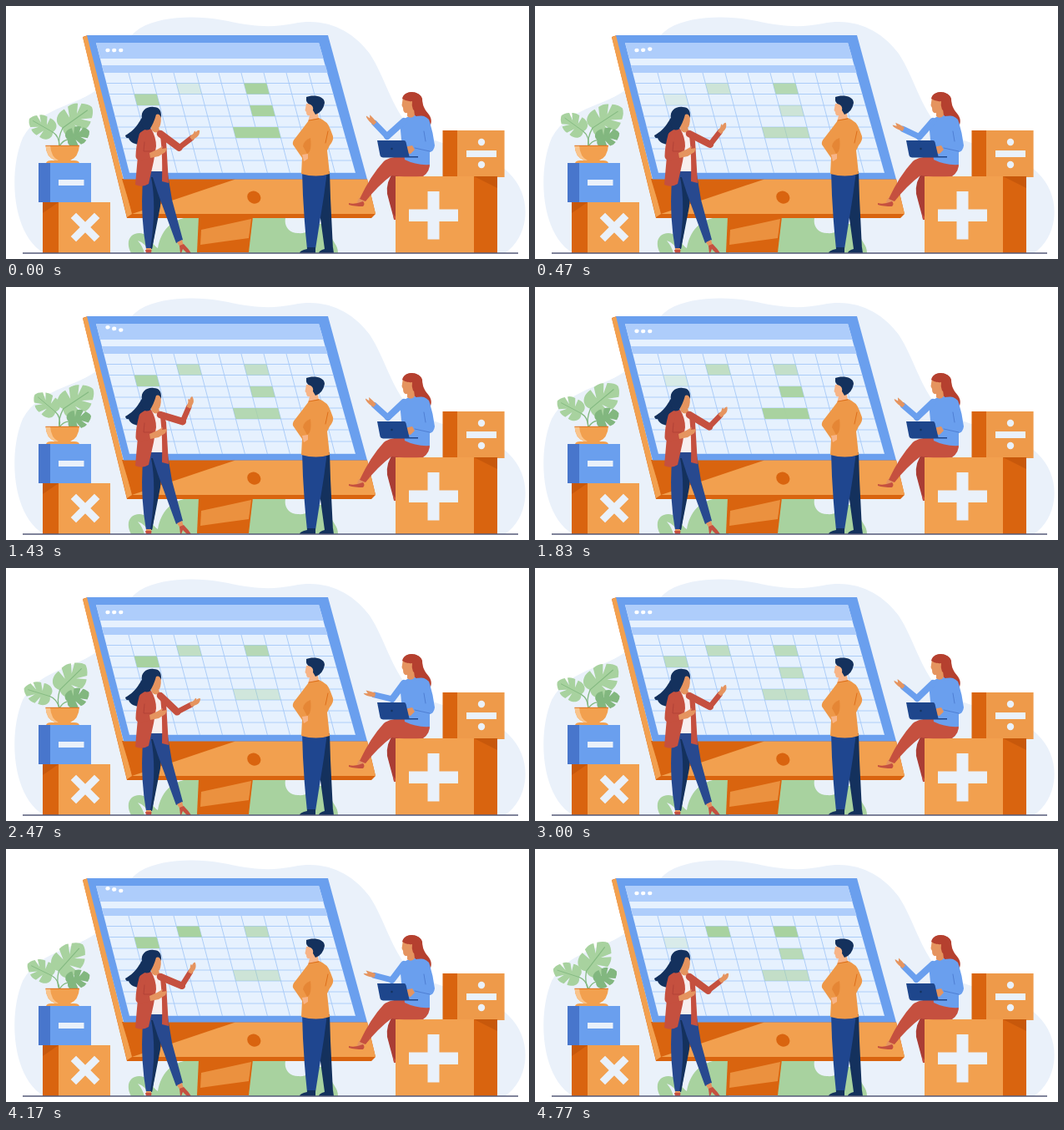
Write an HTML page that moves like this. It is 627 px wide and 303 px high and loops after 4.81 s.

```html
<!DOCTYPE html>
<html lang="en">
<head>
<meta charset="utf-8">
<title>Spreadsheet team</title>
<style>
html, body { margin: 0; width: 100%; height: 100%; overflow: hidden; background: #fff; }
svg { display: block; width: 100vw; height: 100vh; }
.bg { fill: #eaf1fa; }
.or { fill: #f2a04f; }
.dk { fill: #d9640f; }
.dd { fill: #c7580b; }
.bl { fill: #6a9fee; }
.nv { fill: #14315d; }
.red { fill: #c5503f; }
.skin { fill: #e5945f; }
.gr { fill: #a8d29f; }
.line { fill: none; stroke-linecap: round; stroke-linejoin: round; }
</style>
</head>
<body>
<svg viewBox="0 0 627 303">
  <path class="bg" d="M46 296C8 276 2 200 20 158C41 118 94 120 118 92C138 66 136 44 160 27C187 11 232 11 266 18C297 25 320 26 345 21C386 13 416 31 436 57C454 84 462 122 486 147C514 168 577 172 602 199C633 228 627 277 598 296Z"/>

  <!-- foliage behind the stand -->
  <path class="gr" d="M150 296C143 283 148 272 160 272C172 273 174 285 182 290C186 268 198 258 213 254H232V296ZM291 254H335C333 264 340 272 350 272C360 273 367 268 371 262C378 258 388 264 390 275C391 283 398 285 398 296H291Z"/>
  <path class="bg" d="M158 281Q168 284 172 296H166Q164 288 158 281ZM336 254H356V270Q339 274 336 254Z"/>

  <!-- monitor -->
  <path class="dk" d="M231 252H296L291 295H229Z"/>
  <path class="or" d="M234 268L294 255L291 278L233 286Z" opacity=".75"/>
  <path class="dk" d="M92 37L98 35L140 207H433L443 249L438 254H145Z"/>
  <path class="or" d="M92 37.5L98 35L151 249L145 253Z"/>
  <path class="dk" d="M139 207H276L152 250Z"/>
  <path class="or" d="M275 207.5H433L443 249H151Z"/>
  <ellipse class="dk" cx="297.3" cy="229" rx="8.3" ry="7.3" transform="rotate(25 297 229)"/>
  <path class="bl" d="M97 35H386L433 207.500H141Z"/>
  <path d="M108 44H375L419 200H148Z" fill="#e6f1fe"/>
  <path d="M108 44H375L380.5 63H113ZM115 71H383L385.6 80H117.3Z" fill="#aecdfb"/>
  <clipPath id="screen"><path d="M117 80H385.2L419 200H148Z"/></clipPath>
  <g clip-path="url(#screen)">
    <path id="grid" fill="none" stroke="#a5c9f8" stroke-width=".9"/>
    <g id="cells"></g>
  </g>
  <g id="dots" fill="#fff"></g>

  <!-- plant -->
  <g id="plant"></g>
  <path class="or" d="M47.500 167H88Q87 181 77 185H59Q48 181 47.500 167Z"/>
  <path d="M47.500 167H53Q54 181 63 185H59Q48 181 47.500 167Z" fill="#f9c48c"/>
  <path d="M47.500 167.300H88" stroke="#d9640f" stroke-width=".8"/>
  <path class="or" d="M48 188Q49 185 54 185H82Q87 185 88 188Z"/>

  <!-- boxes -->
  <path d="M39 188H54V235H39Z" fill="#4876cc"/>
  <path class="bl" d="M53 188H102V235H53Z"/>
  <path class="bg" d="M63 208H93.500V215H63Z"/>
  <path class="dk" d="M44 235H64V296H44Z"/>
  <path class="dd" d="M44 235H63L44 248Z"/>
  <path class="or" d="M63 235H125V296H63Z"/>
  <path class="bg" d="M75 260.500H115V269.500H75ZM90.500 245H99.500V285H90.500Z" transform="rotate(45 95 265)"/>
  <path class="dk" d="M523.500 149H542V205H523.500Z"/>
  <path d="M541 149H597.600V205H541Z" fill="#ee9a4a"/>
  <path class="bg" d="M552 173H588V181H552Z"/>
  <circle class="bg" cx="570" cy="163" r="4.200"/>
  <circle class="bg" cx="570" cy="190" r="4.200"/>

  <!-- presenter -->
  <path class="nv" d="M168 127C160 136 158 147 143 155Q144 159 147 158C148 163 155 166 161 166L175 152Z"/>
  <path d="M165 196H188L184 238L175 291H168Q160 246 165 196Z" fill="#28498f"/>
  <path class="nv" d="M174 205H188L185 240L175 291H173Q181 240 174 205Z"/>
  <path d="M173 196H193L199 232L212 280L204 284L182 224Z" fill="#28498f"/>
  <path class="skin" d="M168 290H174V293H168ZM205 283L211 280L213 287L209 289Z"/>
  <path class="red" d="M167 292H174.500L174 296H168ZM208 287L213 285Q219 291 222 296H217L212 291L210 296H209Z"/>
  <path d="M174 149H186L193 168L191 198H172Z" fill="#f7eeee"/>
  <path class="skin" d="M172 140H182L184 149Q180 154 175 149Z"/>
  <path class="red" d="M174 147C166 147 160 150 160 157L155 214Q163 218 171 213L177 186L180 168Q180 157 174 147ZM184 149Q190 152 192 162L195 212L187 210Q188 172 184 149Z"/>
  <path id="upperP" class="line" stroke="#c5503f" stroke-width="8.500"/>
  <path id="foreP" class="line" stroke="#c5503f" stroke-width="6.500"/>
  <path id="handP" class="skin" d="M-1-2.500L5-3Q8-5 9-4L8-2.500Q13-3 13-1Q10 3 6 3L-1 2.500Z"/>
  <path class="line" stroke="#c5503f" stroke-width="9" d="M164 155Q160 170 160 180L172 178"/>
  <path class="line" stroke="#a93d35" stroke-width=".7" d="M166 163L165 174L176 174"/>
  <path class="skin" d="M172 176L181 172L188 168L187 171L193 170L191 175L183 180L173 182Z"/>
  <path class="skin" d="M175 127H185Q187 139 184 145Q178 148 173 142Z"/>
  <path class="nv" d="M163 135C161 125 169 120 177 121Q187 121 186 134Q184 128 180 130Q177 141 172 148Q161 151 163 135Z"/>

  <!-- man -->
  <path class="nv" d="M366 198H388L389 230L392 291H382L375 240Z"/>
  <path d="M355 198H385L381 228L371 291H361Q356 245 355 198Z" fill="#1f468f"/>
  <path class="nv" d="M361 289H371V296H352Q352 293 361 291ZM382 289H392L393 296H375Q375 293 382 291Z"/>
  <path fill="#f7b487" d="M360 117L372 116L375 136L362 139L364 131Q360 132 360 127L358.500 125Z"/>
  <path class="nv" d="M360 109C367 106 382 107 382 116Q380 127 371 130L368 125Q369 120 365 118Q359 117 360 109Z"/>
  <path fill="#ee9848" d="M363 137L375 134Q386 138 389 148L392 156Q393 161 388 167L385 173L388 201Q372 206 354 201L355 182L344 166Q343 162 347 158L357 145Z"/>
  <path d="M365 158Q357 161 356 168L361 177Q367 174 365 158Z" fill="#e58635"/>
  <path class="line" stroke="#d9640f" stroke-width=".8" d="M363 137L375 135M386 150L383 164"/>
  <path fill="#f7b487" d="M355 178L362 177L362 183L357 186Z"/>

  <!-- seated woman -->
  <path d="M466 196Q455 211 457 225L465 255H478V196Z" fill="#a93d35"/>
  <path class="red" d="M464 249L470 256H465Z"/>
  <path class="or" d="M467 204H562V296H467Z"/>
  <path class="dk" d="M561 204H589V296H561Z"/>
  <path class="dd" d="M561 204H589V218Z"/>
  <path class="bg" d="M483 243.500H542V258H483ZM505.500 222H519.500V279.500H505.500Z"/>
  <path d="M476 109C480 100 497 102 499 111C499 120 503 125 507 130C512 137 510 145 503 148L485 136Z" fill="#b5402f"/>
  <path class="skin" d="M423 230L431 231L428 237L420 237Z"/>
  <path class="red" d="M411 236Q418 238 428 234Q431 237 428 240Q418 240 411 238Z"/>
  <path class="red" d="M508 186L480 180Q460 180 453 186Q437 203 424 231L431 234Q446 215 462 203Q474 205 500 204Q509 198 508 186Z"/>
  <path class="bl" d="M483 132Q500 128 507 136Q512 150 514 167Q513 174 508 175V190Q492 191 478 184Q477 170 474 160L472 138Z"/>
  <path id="upperS" class="line" stroke="#6a9fee" stroke-width="8"/>
  <path id="foreS" class="line" stroke="#6a9fee" stroke-width="7"/>
  <path id="handS" class="skin" d="M-1-2.500L5-3Q12-3 13-1L8 0L11 3L5 3L-1 2.500Z"/>
  <path class="line" stroke="#4876cc" stroke-width=".8" d="M508 174L490 170M501 150L503 162"/>
  <path class="skin" d="M476 109L487 108L490 131Q486 136 481 132L481 128Q476 129 476 122L474.500 119Z"/>
  <path d="M475 111C477 100 497 100 499 113Q499 123 504 131L491 132Q492 126 488 124Q486 119 487 114Q481 115 475 111Z" fill="#b5402f"/>
  <path class="skin" d="M478 169L487 167L490 172L485 177L479 176Z"/>
  <path d="M445 161H477Q479 161 479.500 163L483.500 180H494V181.500H452Q449 181 448.500 179Z" fill="#1e468c"/>
  <circle cx="462.500" cy="171" r="1.200" fill="#14315d"/>

  <path d="M20 296H614" stroke="#555a78" stroke-width="1.400"/>
</svg>
<script>
const NS = 'http://www.w3.org/2000/svg';
const LOOP = 4810;
const $ = id => document.getElementById(id);

function add(parent, tag, attrs) {
  const el = document.createElementNS(NS, tag);
  for (const k in attrs) el.setAttribute(k, attrs[k]);
  return parent.appendChild(el);
}

// Eased value from [time, value] pairs
function keyed(keys, t) {
  for (let i = 1; i < keys.length; i++) {
    const [t0, a] = keys[i - 1], [t1, b] = keys[i];
    if (t <= t1) return a + (b - a) * (1 - Math.cos(Math.PI * (t - t0) / (t1 - t0))) / 2;
  }
  return keys[keys.length - 1][1];
}

// 1 at time `peak`, 0 half a period later
const wave = (t, period, peak = 0) => (1 + Math.cos(2 * Math.PI * (t - peak) / period)) / 2;
const rad = deg => deg * Math.PI / 180;
const polar = ([x, y], len, deg) => [x + len * Math.cos(rad(deg)), y + len * Math.sin(rad(deg))];

// Spreadsheet grid
const rows = [80, 92.5, 105.5, 119, 132, 145, 158, 171, 185, 200];
const slope = 0.262;
const colX = (c, y) => 147 + 27 * c + slope * (y - 80);
let lines = rows.slice(1).map(y => `M100 ${y}H430`).join('');
for (let c = 0; c < 9; c++) lines += `M${colX(c, 80)} 80L${colX(c, 200)} 200`;
$('grid').setAttribute('d', lines);

const bKeys = [[0, .25], [970, .6], [2470, .6], [3530, .65], [4170, 1], [LOOP, 1]];
const cKeys = [[0, 1], [970, .55], [1830, .55], [2470, .76], [3530, .58], [4170, .62], [4770, 1]];
const cells = [
  [0, 2, 1, t => .2 + .8 * Math.min(1, 1.12 * wave(t, 1440, 1200))],
  [2, 1, 1, t => keyed(bKeys, t)],
  [5, 1, 1, t => keyed(cKeys, t)],
  [5, 3, 1, t => wave(t, 1690)],
  [4, 5, 2, t => .3 + .7 * wave(t, 1760)]
].map(([c, r, span, alpha]) => {
  const y0 = rows[r], y1 = rows[r + 1];
  const d = `M${colX(c, y0)} ${y0}L${colX(c + span, y0)} ${y0}L${colX(c + span, y1)} ${y1}L${colX(c, y1)} ${y1}Z`;
  return { el: add($('cells'), 'path', { d, class: 'gr' }), alpha };
});

// Window dots hop from right to left
const dots = [[122, 490], [129.7, 370], [137.8, 250]].map(([cx, start]) =>
  ({ el: add($('dots'), 'ellipse', { cx, cy: 53, rx: 2.6, ry: 2.3 }), start }));

function hop(t, start) {
  const p = (t % 2850 - start) / 1410;
  return p > 0 && p < 1 ? 6.3 * Math.sin(Math.PI * p) ** 2 : 0;
}

// Plant leaves swing about the soil
const half = s => `C-.14 ${-.22 * s} .06 ${-.44 * s} .34 ${-.4 * s}L.32 ${-.12 * s}L.46 ${-.4 * s}` +
  `Q.64 ${-.4 * s} .74 ${-.31 * s}L.55 ${-.09 * s}L.82 ${-.25 * s}Q.97 ${-.13 * s} 1 0`;
const leafPath = `M0 0${half(1)}L0 0${half(-1)}Z`;

const leaves = [
  { base: [56, 151], tip: [28, 135], stem: '64 156', fill: '#a8d29f',
    keys: [[0, 0], [1080, 15], [2400, -13], [3500, 6], [4770, -12]] },
  { base: [68, 146], tip: [103, 121], stem: '62 158', fill: '#a8d29f',
    keys: [[0, 0], [970, 5], [2400, -9], [3300, -4], [4770, -17]] },
  { base: [74, 160], tip: [100, 150], stem: '68 161', fill: '#82b77f',
    keys: [[0, 0], [1050, 10], [2300, -2], [3500, 10], [4770, -6]] }
].map(({ base: [x, y], tip: [u, v], stem, fill, keys }) => {
  const el = add($('plant'), 'g', {});
  const len = Math.hypot(u - x, v - y), turn = Math.atan2(v - y, u - x) * 180 / Math.PI;
  const g = add(el, 'g', { transform: `translate(${x} ${y}) rotate(${turn}) scale(${len})` });
  add(g, 'path', { d: leafPath, fill });
  add(g, 'path', { d: 'M0 0H.85', stroke: '#83b980', 'stroke-width': .025 });
  add(el, 'path', { d: `M64 168Q${stem} ${x} ${y}`, class: 'line', stroke: '#83b980', 'stroke-width': 1.3 });
  return { el, keys };
});

function pose(who, shoulder, elbow, len, deg) {
  const wrist = polar(elbow, len, deg);
  $('upper' + who).setAttribute('d', `M${shoulder}L${elbow}`);
  $('fore' + who).setAttribute('d', `M${elbow}L${wrist}`);
  $('hand' + who).setAttribute('transform', `translate(${wrist}) rotate(${deg})`);
}

const reach = [[0, .77], [1100, 0], [2400, 1], [3600, -.03], [LOOP, .77]];

function draw(t) {
  for (const { el, alpha } of cells) el.setAttribute('opacity', alpha(t));
  for (const { el, start } of dots) el.setAttribute('cy', 53 - hop(t, start));
  for (const { el, keys } of leaves) el.setAttribute('transform', `rotate(${keyed(keys, t)} 66 168)`);

  const p = keyed(reach, t), shoulder = [185, 153];
  pose('P', shoulder, polar(shoulder, 28, 12 + 32 * p), 19, -74 + 47 * p);

  const q = 1 - wave(t, 1620);
  pose('S', [477, 138], [457 + 6 * q, 156 + q], 22, 226 - 33 * q);
}

function tick() {
  draw(performance.now() % LOOP);
  requestAnimationFrame(tick);
}
tick();
</script>
</body>
</html>
```
